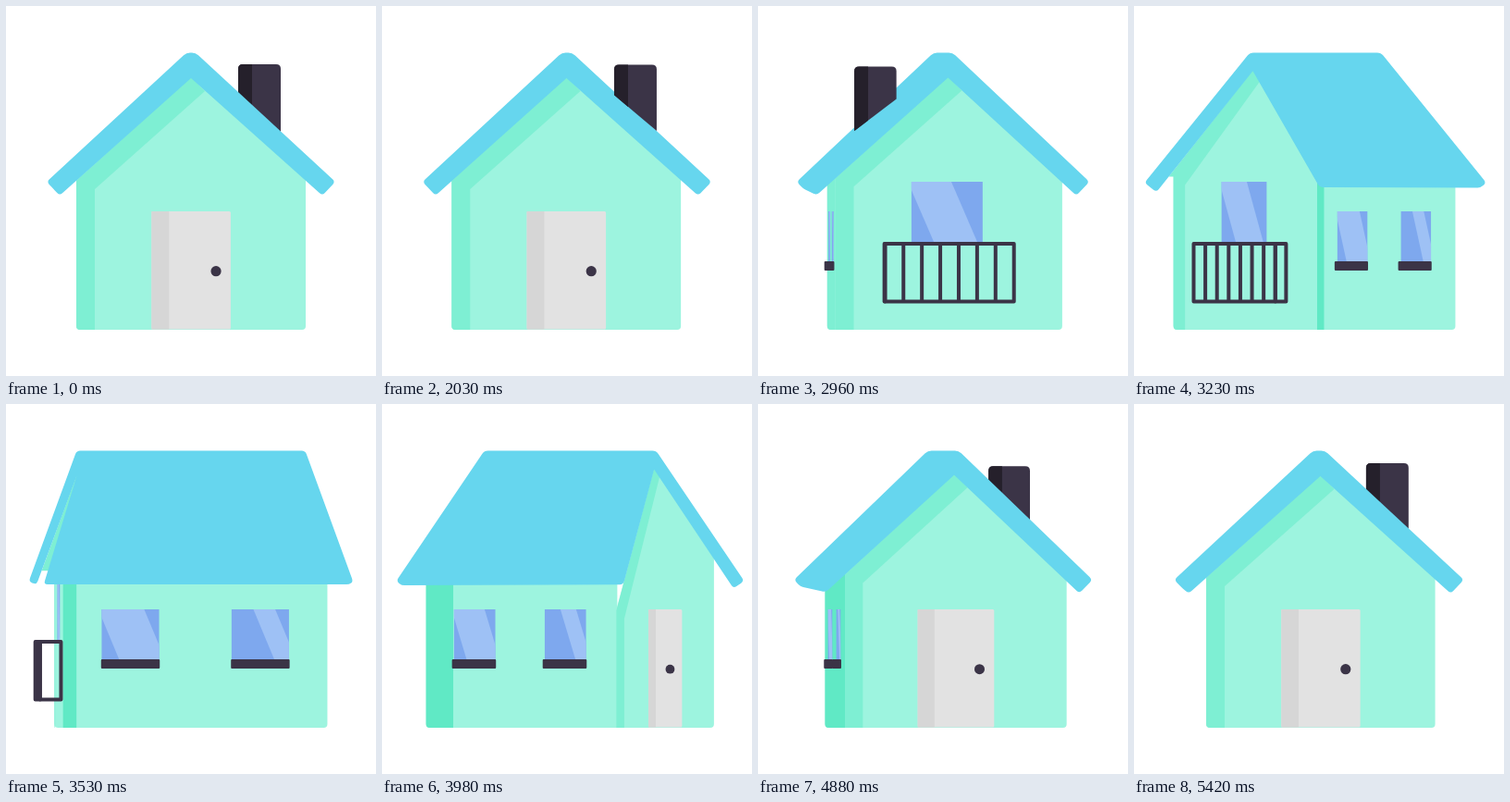
These frames come from a looping animation (400 px wide and 400 px high, 5.45 s). An HTML page with a canvas:

```html
<!DOCTYPE html>
<html lang="en">
<head>
<meta charset="utf-8">
<title>Turning house</title>
<style>
html, body { margin: 0; width: 100%; height: 100%; overflow: hidden; background: #fff; }
canvas { display: block; width: 400px; height: 400px; }
</style>
</head>
<body>
<canvas id="stage"></canvas>
<script>
const LOOP = 5450, START = 2030, STEP = 30;
const LIGHT = '#9df4df', MEDIUM = '#7eefd3', DEEP = '#60e9c5', ROOF = '#66d6ee';
const DARK = '#3b3447', DARKER = '#25202b', GLASS = '#7ea8ee', SHINE = '#9ec1f5';
const DOOR = '#e2e2e2', DOOR_SIDE = '#d6d6d6';

const canvas = document.getElementById('stage');
const ctx = canvas.getContext('2d');
const ratio = window.devicePixelRatio || 1;
canvas.width = canvas.height = 400 * ratio;

// time in ms, turn in degrees
const turns = [[2000, 0], [2030, 1.5], [2540, 73.7], [2960, 173.2],
  [3530, 262.4], [4460, 336.4], [5420, 357.2], [5450, 357.4]];

function slope(i) {
  return (turns[i + 1][1] - turns[i][1]) / (turns[i + 1][0] - turns[i][0]);
}

function tangent(i) {
  if (i === 0) return slope(0);
  if (i === turns.length - 1) return slope(i - 1);
  const a = slope(i - 1), b = slope(i);
  return 2 * a * b / (a + b);
}

function turnAt(t) {
  if (t < START) return 0;
  t = START + Math.floor((t - START) / STEP) * STEP;
  let i = 0;
  while (i < turns.length - 2 && t >= turns[i + 1][0]) i++;
  const [t0, v0] = turns[i], [t1, v1] = turns[i + 1];
  const h = t1 - t0, u = (t - t0) / h, w = 1 - u;
  return v0 * (1 + 2 * u) * w * w + tangent(i) * h * u * w * w
    + v1 * u * u * (3 - 2 * u) - tangent(i + 1) * h * u * u * w;
}

// polygon of [x, y, corner radius]
function poly(points, color) {
  const n = points.length;
  const toward = (p, q, r) => {
    const len = Math.hypot(q[0] - p[0], q[1] - p[1]);
    const k = len ? Math.min(r, len / 2) / len : 0;
    return [p[0] + (q[0] - p[0]) * k, p[1] + (q[1] - p[1]) * k];
  };
  ctx.beginPath();
  points.forEach((p, i) => {
    const r = p[2] || 0;
    const a = toward(p, points[(i + n - 1) % n], r);
    const b = toward(p, points[(i + 1) % n], r);
    ctx.lineTo(a[0], a[1]);
    if (r) ctx.quadraticCurveTo(p[0], p[1], b[0], b[1]);
  });
  ctx.closePath();
  ctx.fillStyle = color;
  ctx.fill();
}

function rect(x0, y0, x1, y1, color, r = 0) {
  poly([[x0, y0, r], [x1, y0, r], [x1, y1, r], [x0, y1, r]], color);
}

function pane(x0, x1, y0, y1, from, width) {
  const w = x1 - x0, lean = w * 0.37;
  if (w <= 0) return;
  rect(x0, y0, x1, y1, GLASS);
  ctx.save();
  ctx.beginPath();
  ctx.rect(x0, y0, w, y1 - y0);
  ctx.clip();
  const a = x0 + from * w, b = a + width * w;
  poly([[a, y0], [b, y0], [b + lean, y1], [a + lean, y1]], SHINE);
  ctx.restore();
}

function railBox(x0, x1) {
  ctx.strokeStyle = DARK;
  ctx.lineWidth = 4;
  ctx.lineJoin = 'round';
  ctx.strokeRect(Math.min(x0, x1), 257, Math.abs(x1 - x0), 62.5);
}

function lineY(p, q, x) {
  return p[1] + (q[1] - p[1]) * (x - p[0]) / (q[0] - p[0]);
}

function pose(deg) {
  const a = deg * Math.PI / 180, co = Math.cos(a), si = Math.sin(a);
  const c = Math.pow(Math.abs(co), 1.64), s = Math.pow(Math.abs(si), 1.64);
  const double = Math.sin(2 * a), mid = double * double;
  const dir = double > 0 ? -1 : 1;
  const bodyShift = -8 * double * c;
  const roofShift = 4 * Math.pow(mid, 1.5) * dir;
  const eave = 172 * Math.pow(s, 1.1) + 6 * mid;
  const ridge = 125 * Math.pow(s, 0.9);
  const mx = 200 + bodyShift + dir * (145 * s + 1.5 * mid);
  const cx = 200 + roofShift;
  const apex = [cx + dir * ridge, 78 - 8 * mid];
  const near = cx + dir * eave, far = cx - dir * eave;
  return {
    c, s, dir, apex, near, far, cx, ridge, co, mx,
    front: co >= 0, chimneySide: si > 0,
    x0: mx - 124 * c, x1: mx + 124 * c,
    sideW: 290 * s + 3 * mid,
    farX: 200 + bodyShift - dir * (145 * s + 1.5 * mid),
    outLow: [near + dir * (142 * c - 8 * s), 195 + 10 * c],
    inLow: [near - dir * (142 * c + 5.5 * s), 195 + 10 * Math.pow(c, 5)]
  };
}

function chimney(p) {
  const { c, s } = p, sign = p.co >= 0 ? 1 : -1;
  const x = 200 + s + sign * 74 * c, half = 23 * c + 34 * s * s;
  const top = 63 + 20 * Math.pow(s, 0.6);
  const outer = 135 + 4 * s, inner = 95 + 45 * Math.pow(s, 0.6);
  const left = sign > 0 ? inner : outer, right = sign > 0 ? outer : inner;
  const l = x - half, r = x + half, strip = 15 * c + 3 * s;
  const y = p.chimneySide ? [left, right] : [136, 136];
  poly([[l, top, 5], [r, top, 5], [r, y[1]], [l + 4 * s, y[0]]], DARK);
  const edge = y[0] + (y[1] - y[0]) * strip / (2 * half);
  poly([[l, top, 5], [l + strip, top], [l + strip, edge], [l + 4 * s, y[0]],
    [l, y[0] - 34 * s]], DARKER);
}

function sideWall(p) {
  const { c, s, dir, sideW: w } = p;
  if (w < 4) return;
  const l = dir > 0 ? p.x0 - w : p.x1, r = l + w;
  const shade = dir > 0 ? Math.min(w, 15 + 48 * (1 - s)) : 15 * s;
  const tone = p.chimneySide ? MEDIUM : DEEP;
  // overlap the neighbouring face a little to hide the seam
  const a = dir < 0 ? l - Math.min(2, c * 9) : l, b = dir > 0 ? r + 1 : r;
  poly([[a, 178], [b, 178], [b, 350, dir < 0 ? 4 : 0], [a, 350, dir > 0 ? 4 : 0]], LIGHT);
  poly([[l, 178], [l + shade, 178], [l + shade, 350], [l, 350, dir > 0 ? 4 : 0]], tone);

  const window = (f, from, width) => {
    const x0 = l + f * w, x1 = x0 + 0.217 * w;
    pane(x0, x1, 222, 277, from, width);
    rect(x0 - 0.5 - 4 * c, 276, x1 + 0.7, 286, DARK, 1);
  };
  if (p.chimneySide) window(0.15, 0.5, 1);
  else window(0.147, -0.06, 0.8);
  window(0.638 - 0.08 * c * c, 0.38, 0.38);
}

function faceWall(p) {
  const { c, s, dir, apex, x0, x1 } = p, w = x1 - x0;
  const leftLow = dir > 0 ? p.inLow : p.outLow;
  const soffitY = 189 - 9 * s;
  const yl = dir > 0 ? lineY(apex, leftLow, x0) : soffitY;
  const yr = dir > 0 ? lineY(apex, p.outLow, x1) : 185;
  let ix = x0;
  if (dir < 0) {
    const k = (soffitY - apex[1]) / (leftLow[1] - apex[1]);
    ix = Math.min(x0, apex[0] + (leftLow[0] - apex[0]) * k);
  }
  const alone = p.sideW < 4;
  const rl = dir < 0 || alone ? 4 : 0, rr = dir > 0 || alone ? 4 : 0;
  poly([[x0, 350, rl], [x0, yl - 1], [apex[0], apex[1] - 2], [x1, yr - 1], [x1, 350, rr]], LIGHT);
  const sx = x0 + 20 * c;
  poly([[apex[0], apex[1] - 1], [apex[0] + 15 * c, apex[1] + 14 * c],
    [sx, yl + 9], [sx, 350], [x0, 350, rl], [x0, yl], [ix, yl]], MEDIUM);

  if (p.front) {
    const a = x0 + 0.328 * w, b = x0 + 0.673 * w;
    rect(a, 222, b, 349.5, DOOR, 1.5);
    rect(a, 222, a + 0.076 * w, 349.5, DOOR_SIDE);
    ctx.beginPath();
    ctx.arc(x0 + (0.609 - 0.1 * Math.pow(s, 1.5)) * w, 286.7, 5.6 - s, 0, 7);
    ctx.fillStyle = DARK;
    ctx.fill();
  } else {
    pane(x0 + 0.335 * w, x0 + 0.649 * w, 190, 256, -0.05, 0.61);
  }
}

function nearBalcony(p) {
  const half = 70.5 * p.c, out = p.dir * 23 * p.s;
  const edge = p.mx - p.dir * half;
  if (p.s > 0.02) railBox(edge, edge + out);
  const l = p.mx + out - half;
  railBox(l, l + 2 * half);
  ctx.beginPath();
  for (let i = 1; i < 7; i++) {
    const x = l + 2 * half * i / 7;
    ctx.moveTo(x, 257);
    ctx.lineTo(x, 319.5);
  }
  ctx.stroke();
}

// only the part that sticks out past the wall
function farBalcony(p) {
  const out = 23 * p.s - 53.5 * p.c;
  if (out < 2) return;
  const wall = p.farX - p.dir * 124 * p.c;
  railBox(wall, wall - p.dir * out);
}

function roof(p) {
  const { c, s, dir, cx, ridge, apex } = p;
  const top = ridge + 5 * c;
  const out = p.near + dir * 156 * c, far = p.far - dir * 156 * c;
  const y = 190 + 2 * s;
  poly([
    [cx - dir * top, 50.5, 4],
    [cx + dir * top, 50.5, 4],
    [out, y, 4],
    [p.outLow[0], p.outLow[1], 4],
    apex,
    [p.inLow[0], p.inLow[1], 4],
    [far + dir * (7 * c + 4 * s), 195 + 2.5 * c, 3],
    [far, y, 4]
  ], ROOF);
}

function draw(t) {
  const p = pose(turnAt(t));
  ctx.setTransform(ratio, 0, 0, ratio, 0, 0);
  ctx.fillStyle = '#fff';
  ctx.fillRect(0, 0, 400, 400);
  if (!p.chimneySide) chimney(p);
  sideWall(p);
  faceWall(p);
  roof(p);
  if (p.front) farBalcony(p);
  else nearBalcony(p);
  if (p.chimneySide) chimney(p);
}

const begin = performance.now();
function tick() {
  draw((performance.now() - begin) % LOOP);
  requestAnimationFrame(tick);
}
tick();
</script>
</body>
</html>
```
